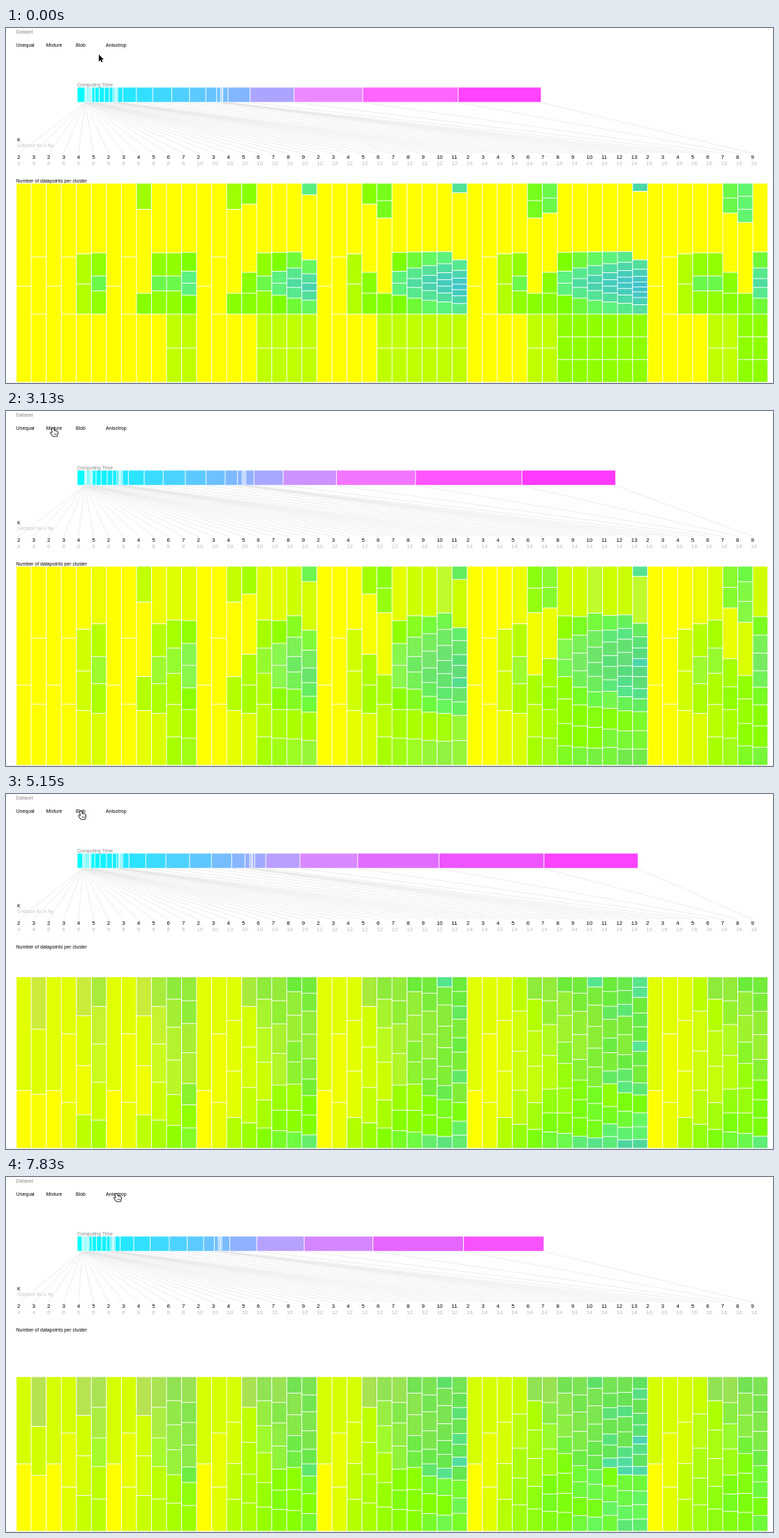
Write an HTML page with a canvas that moves like this. It is 1099 px wide and 510 px high and loops after 8 s.

```html
<!DOCTYPE html>
<html lang="en">
<head>
<meta charset="utf-8">
<title>Cluster explorer</title>
<style>
  html, body { margin: 0; width: 100%; height: 100%; overflow: hidden; background: #fff; }
  canvas { display: block; width: 1099px; height: 510px; }
</style>
</head>
<body>
<canvas id="stage" width="1099" height="510"></canvas>
<script>
const ctx = document.getElementById('stage').getContext('2d');
const LOOP = 8000, DURATION = 2000;
const TOP = 223, FLOOR = 509, LEFT = 14.6, COL_W = 21.54;

const mix = (a, b, k) => a + (b - a) * k;
const mixAll = (a, b, k) => a.map((v, i) => mix(v, b[i], k));
const clamp = v => Math.max(0, Math.min(1, v));
const ease = t => t < 0.5 ? 4 * t ** 3 : 1 - 4 * (1 - t) ** 3;
const rgb = c => `rgb(${c.map(Math.round).join(',')})`;
const noise = n => {
  const v = Math.sin(n * 12.9898) * 43758.5453;
  return v - Math.floor(v);
};

// Piecewise linear lookup; each stop is [position, ...values].
function along(stops, x) {
  if (x <= stops[0][0]) return stops[0].slice(1);
  for (let i = 1; i < stops.length; i++) {
    const a = stops[i - 1], b = stops[i];
    if (x <= b[0]) return mixAll(a.slice(1), b.slice(1), (x - a[0]) / (b[0] - a[0]));
  }
  return stops[stops.length - 1].slice(1);
}

// Top edges of n stacked parts; weight(u, j) gives the share of part j.
function split(from, to, n, weight = () => 1) {
  const shares = Array.from({ length: n }, (_, j) => weight((j + 0.5) / n, j));
  const total = shares.reduce((a, b) => a + b, 0);
  let sum = 0;
  return shares.map(share => {
    const y = mix(from, to, sum / total);
    sum += share;
    return y;
  });
}

const sizeColors = [
  [3, 50, 175, 235], [18, 95, 245, 120], [27, 125, 255, 0],
  [44, 180, 255, 0], [75, 255, 255, 0]
];
const timeColors = [
  [102, 0, 252, 255], [220, 62, 217, 255], [310, 112, 190, 255], [395, 184, 160, 255],
  [466, 238, 136, 255], [512, 255, 119, 255], [700, 255, 68, 255], [950, 255, 42, 255]
];

// Every grid size is tried with k = 2 up to maxK.
const columns = [];
for (let grid = 4; grid <= 16; grid += 2) {
  const maxK = grid < 16 ? grid - 1 : 9;
  for (let k = 2; k <= maxK; k++) columns.push({ grid, k, u: (k - 2) / (maxK - 2) });
}

// Three clouds; the small middle one is divided most.
function unequalCuts({ grid, k }) {
  const half = grid / 2;
  const near = k === half || k === half - 1;
  const tops = near ? Math.floor(k / 2) : grid > 8 && k === grid - 1 ? 2 : 1;
  const large = k < 6 ? 1 : k < 8 || grid < 14 ? 2 : 3;
  const mids = k - tops - large;
  if (!mids) return [TOP, 371];
  const midTop = tops > 1 ? 411 - Math.min(30 * mids, 78) : 320 + 9 / mids;
  return [
    ...split(TOP, TOP + tops * 150 / k, tops),
    ...split(midTop, 411, mids, u => 1 + 5 * (u - 0.5) ** 2),
    ...split(411, FLOOR, large)
  ];
}

const jitter = (k, j) => 1 + 0.07 * (k - 2) * (noise(k * 17 + j) - 0.5);

const mixtureCuts = ({ k }) => k === 2 ? [TOP, 430] :
  split(TOP, FLOOR, k, (u, j) => (0.85 + 2.1 * u - 2.6 * u * u) * jitter(k, j));

// A few large clusters below, the remaining small ones squeezed on top.
function blobCuts({ grid, k }) {
  const large = Math.min(k - 1, Math.floor((grid + 2) / 4));
  const small = k - large;
  const thin = Array.from({ length: small }, (_, j) =>
    384 + 30 * (j / small) ** (1 + 2.4 / Math.max(1, small - 1)));
  return [...thin, ...split(414, FLOOR, large)];
}

const anisotropCuts = ({ k }) => k === 2 ? [234, 411] :
  split(234, FLOOR, k, (u, j) => (1 + 0.25 * Math.cos(Math.PI * u)) * jitter(k, j));

// Computing time peaks at a middle k, except on the finest grid where it keeps growing.
const bump = [
  [0, 0.04], [0.18, 0.05], [0.27, 0.25], [0.36, 0.7], [0.55, 1],
  [0.73, 0.85], [0.82, 0.55], [0.91, 0.2], [1, 0.07]
];
const growth = [[0, 0.01], [0.14, 0.02], [0.29, 0.11], [0.86, 1.03], [1, 0.92]];

function timeEdges({ first, middle, last, curve }) {
  let x = first;
  return columns.map(({ grid, u }, i) => {
    if (grid === 16) x += last * along(growth, u)[0] ** curve;
    else if (i) x += 0.1 + middle * (grid / 14) ** 8.5 * along(bump, u)[0];
    return x;
  });
}

function makeState(cutRule, times) {
  const cuts = columns.map(column => [...cutRule(column), FLOOR]);
  const edges = timeEdges(times);
  return {
    cuts, edges,
    colors: cuts.map(c => c.slice(1).map((y, i) => along(sizeColors, y - c[i]))),
    barColors: edges.map((x, i) => along(timeColors, (x + (i ? edges[i - 1] : 102)) / 2))
  };
}
const unequal = makeState(unequalCuts, { first: 113, middle: 27.4, last: 132.5, curve: 1.3 });
const mixture = makeState(mixtureCuts, { first: 112, middle: 39, last: 172.4, curve: 1 });
const blob = makeState(blobCuts, { first: 103.5, middle: 18.2, last: 68, curve: 1 });
const anisotrop = makeState(anisotropCuts, { first: 112, middle: 32.6, last: 158, curve: 1.1 });

const moves = [
  [2010, unequal, mixture], [4360, mixture, blob], [6720, blob, anisotrop]
];

// The picture is refreshed in even steps: [start, step].
const beats = [
  [0, 50], [50, 94], [1410, 57], [2090, 210], [3340, 200], [4350, 200], [5560, 210], [6780, 210]
];
const latest = (list, t) => list.filter(item => item[0] <= t).pop() || list[0];
function stepped(t) {
  const [start, step] = latest(beats, t);
  return start + Math.floor((t - start) / step) * step;
}

const pointerPath = [
  [0, 133, 38], [990, 30, 25], [1350, 30, 25], [1580, 67, 25], [3130, 67, 25],
  [3740, 108, 25], [5350, 107, 25], [5770, 120, 24], [6400, 158, 24]
];
const buttons = [
  ['Unequal', 14.5, 41], ['Mixture', 57.5, 80], ['Blob', 100, 115], ['Anisotrop', 143, 173]
];

function label(text, x, y, color = '#000', size = 7) {
  ctx.font = `${size}px "Liberation Sans", Arial, sans-serif`;
  ctx.fillStyle = color;
  ctx.fillText(text, x, y);
}

// A filled box that leaves a thin gap to its neighbours.
function cell(x, y, w, h, color) {
  const dx = Math.min(0.5, w * 0.35), dy = Math.min(0.5, h * 0.35);
  ctx.fillStyle = rgb(color);
  ctx.fillRect(x + dx, y + dy, w - 2 * dx, h - 2 * dy);
}

function drawLabels() {
  label('Dataset', 14.5, 8, '#888');
  for (const [name, x] of buttons) label(name, x, 26.5);
  label('Computing Time', 102, 84, '#888');
  label('K', 16, 163);
  label('Gridsize Nx x Ny', 16, 171, '#c4c4c4');
  columns.forEach(({ grid, k }, i) => {
    const x = 16 + 21.46 * i;
    label(k, x, 188, '#000', 8);
    label(grid, x, 197, '#bbb', 8);
  });
  label('Number of datapoints per cluster', 14.5, 222);
}

function drawTimeBar(from, to, k) {
  const ends = mixAll(from.edges, to.edges, k);
  ctx.strokeStyle = '#e2e2e2';
  ctx.lineWidth = 0.7;
  ctx.beginPath();
  ends.forEach((x, i) => {
    ctx.moveTo(x, 107);
    ctx.lineTo(18 + 21.46 * i, 180);
  });
  ctx.stroke();
  ends.forEach((x, i) => {
    const start = i ? ends[i - 1] : 102;
    cell(start, 85, x - start, 21.8, mixAll(from.barColors[i], to.barColors[i], k));
  });
}

function drawColumns(from, to, k) {
  from.cuts.forEach((cut, i) => {
    const x = LEFT + i * COL_W;
    const ys = mixAll(cut, to.cuts[i], k);
    ctx.fillStyle = '#fff';
    ctx.fillRect(x, ys[0], COL_W, FLOOR - ys[0]);
    from.colors[i].forEach((color, j) =>
      cell(x, ys[j], COL_W, ys[j + 1] - ys[j], mixAll(color, to.colors[i][j], k)));
  });
  ctx.fillStyle = '#eee';
  ctx.fillRect(0, FLOOR, 1099, 1);
}

const arrow = new Path2D('M0 0V10L2.3 7.9L3.9 11.2L5.5 10.5L4 7.3H7Z');
const hand = new Path2D('M-1.2 0.4Q0 -1 1 0.6L2 3.8L3.6 3.4L5.2 4L6.4 4.4' +
  'Q7.4 5 7 7.2L6 11H0.4L-2.8 6.8Q-3.2 5.4 -1.8 5.6L-0.2 6.8Z');
const knuckles = new Path2D('M2 7.2V9.4M3.6 7.2V9.4M5.2 7.2V9.4');

function drawPointer(time) {
  const [x, y] = along(pointerPath, time);
  const over = y < 31 && buttons.some(([, a, b]) => x >= a && x <= b);
  ctx.save();
  ctx.translate(x, y);
  ctx.lineJoin = 'round';
  ctx.lineWidth = over ? 1.7 : 1;
  ctx.strokeStyle = over ? '#000' : '#fff';
  ctx.fillStyle = over ? '#fff' : '#000';
  const shape = over ? hand : arrow;
  ctx.stroke(shape);
  ctx.fill(shape);
  if (over) {
    ctx.lineWidth = 0.6;
    ctx.stroke(knuckles);
  }
  ctx.restore();
}

function draw(now) {
  const time = stepped(now % LOOP);
  const [start, from, to] = latest(moves, time);
  const k = ease(clamp((time - start) / DURATION));

  ctx.fillStyle = '#fff';
  ctx.fillRect(0, 0, 1099, 510);
  drawTimeBar(from, to, k);
  drawLabels();
  drawColumns(from, to, k);
  drawPointer(time);
}

function frame() {
  draw(performance.now());
  requestAnimationFrame(frame);
}
frame();
</script>
</body>
</html>
```
